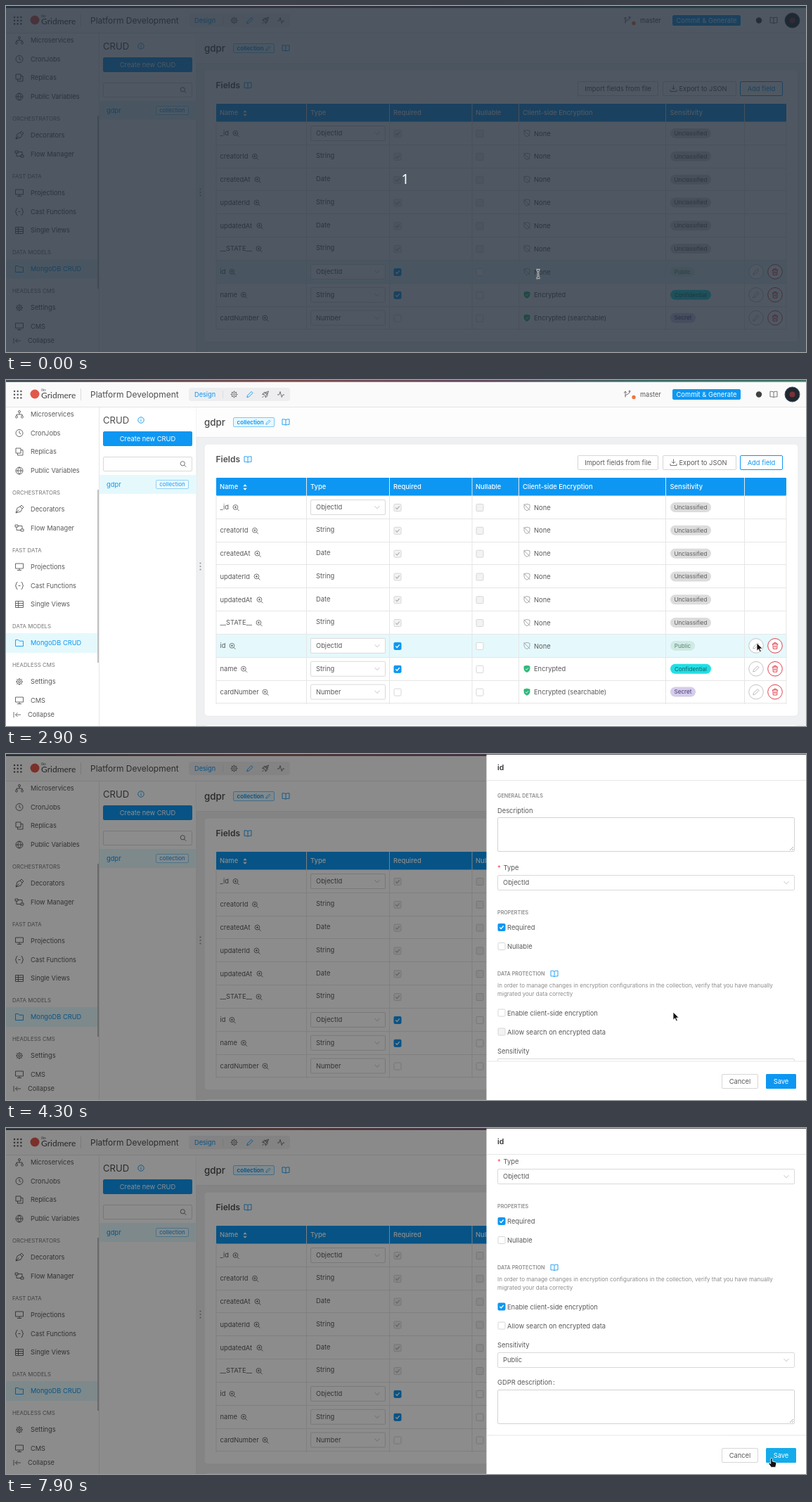
An HTML page for the animation above (8000 ms loop, 1138 by 492 pixels).

```html
<!DOCTYPE html>
<html lang="en">
<head>
<meta charset="utf-8">
<title>CRUD field editor</title>
<style>
html, body { margin: 0; width: 100%; height: 100%; overflow: hidden; background: #eff0f2; }
svg { display: block; width: 100vw; height: 100vh; font-family: Inter, sans-serif; }
</style>
</head>
<body>
<svg id="stage" viewBox="0 0 1138 492"></svg>
<script>
const BLUE = '#0d97f2', PALE = '#e5f9fd', INK = '#595959', LINE = '#e6e6e6';

// y is the middle of the capitals
const text = (x, y, str, { size = 9.35, fill = INK, weight = 400, anchor = 'start', font = '' } = {}) =>
  `<text x="${x}" y="${y + size * .36}" font-size="${size}" fill="${fill}" font-weight="${weight}"
    text-anchor="${anchor}" ${font && `font-family="${font}"`}>${str}</text>`;
const rect = (x, y, w, h, fill, stroke = 'none', r = 0, extra = '') =>
  `<rect x="${x}" y="${y}" width="${w}" height="${h}" fill="${fill}" stroke="${stroke}" rx="${r}" ${extra}/>`;
const circle = (x, y, r, fill, stroke = 'none') =>
  `<circle cx="${x}" cy="${y}" r="${r}" fill="${fill}" stroke="${stroke}"/>`;
const path = (d, x, y, stroke = '#666', fill = 'none', width = .9) =>
  `<path d="${d}" transform="translate(${x} ${y})" stroke="${stroke}" fill="${fill}" stroke-width="${width}"/>`;
const hline = (x, y, w, color = LINE) => rect(x, y, w, 1, color);
const vline = (x, y, h, color = LINE) => rect(x, y, 1, h, color);
const ring = (r, x = 0, y = 0) => `M${x - r} ${y}a${r} ${r} 0 1 0 ${2 * r} 0a${r} ${r} 0 1 0 ${-2 * r} 0`;

const icons = {
  book: 'M0-3.3V4.2M0-3.3C-1-4.2-3-4.3-5-4.2V3.4C-3 3.3-1 3.4 0 4.2C1 3.4 3 3.3 5 3.4V-4.2C3-4.3 1-4.2 0-3.3',
  pencil: 'M-4.2 4.2L-3.5 1.5 2-4 4-2-1.5 3.5Z',
  gear: ring(3.6) + ring(1.5) + 'M0-3.6V-5M0 3.6V5M-3.6 0H-5M3.6 0H5M-2.6-2.6L-3.6-3.6M2.6 2.6L3.6 3.6M2.6-2.6L3.6-3.6M-2.6 2.6L-3.6 3.6',
  rocket: 'M4.5-4.5Q0-4-2.5 .5L-.5 2.5Q4 0 4.5-4.5M-2-.5L-4.5 0-2-3H0M.5 2L0 4.5 3 2V0M-2.5 2.5L-4.5 4.5' + ring(1, 1.5, -1.5),
  pulse: 'M-5 .5H-2.5L-1-4 1.3 4 2.8 .5H5',
  zoom: ring(3.4, -.6, -.6) + 'M2 2L4.5 4.5M-2.2-.6H1M-.6-2.2V1',
  search: ring(3.1, -.7, -.7) + 'M1.6 1.6L4.2 4.2',
  chevron: 'M-3.4-1.8L0 1.8 3.4-1.8',
  trash: 'M-4.2-2.6H4.2M-1.6-2.6V-4.3H1.6V-2.6M-3.2-2.6L-2.7 4.4H2.7L3.2-2.6M-1-.6V2.4M1-.6V2.4',
  shield: 'M0-4.6L4-3.6V0Q4 3 0 4.8Q-4 3-4 0V-3.6Z',
  tick: 'M-2.7 0L-.8 2 2.7-2',
  info: ring(4.2) + 'M0-.6V2.3M0-2.5V-1.5',
  branch: 'M-3 4.5V-3.5M-4.8-1.5L-3-4 -1.2-1.5M-3 3C-3 0 3 1 3-3.5' + ring(1, 3, -4),
  load: 'M0-4.5V1.5M-2.6-1L0 1.6 2.6-1M-4.5 2V4.5H4.5V2',
  nodes: ring(1.5, 0, -4) + ring(1.5, -4, 3.5) + ring(1.5, 4, 3.5) + 'M0-2.5V0M-4 2V0H4V2',
  clock: ring(5) + 'M0-3V0L2.3 1.3',
  copy: 'M-5-5H2V2H-5ZM-2.5 2V5H5V-2.5H2',
  globe: ring(5) + 'M-5 0H5M0-5Q-4.5 0 0 5Q4.5 0 0-5',
  nib: 'M-5 5L-3-2 1-4 4 -1 2 3ZM1-4L3-6 6-3 4-1M-5 5L-.5 .5',
  flow: 'M-6-4.5H-2V-1.5H-6ZM2 1.5H6V4.5H2ZM-2-3H4V1.5M-4-1.5V3H2',
  screen: 'M-5.5-4.5H5.5V2.5H-5.5ZM-3 5H3M0 2.5V5',
  braces: 'M-2.5-5Q-4.5-5-4.5-2.5Q-4.5 0-6 0Q-4.5 0-4.5 2.5Q-4.5 5-2.5 5M2.5-5Q4.5-5 4.5-2.5Q4.5 0 6 0Q4.5 0 4.5 2.5Q4.5 5 2.5 5M-1.5 0H1.5',
  grid: 'M-5.5-4.5H5.5V4.5H-5.5ZM-5.5-1.5H5.5M-1.5-4.5V4.5M-5.5 1.5H5.5',
  folder: 'M-5.5-4.5H-1.5L0-2.8H5.5V4.5H-5.5Z',
  collapse: 'M-5-4V4M5 0H-2.5M.5-3L-2.5 0 .5 3'
};
const icon = (name, x, y, color = '#666', fill) => path(icons[name], x, y, color, fill);

const checkbox = (x, y, state) => {
  const on = state === 'on', off = state.startsWith('locked');
  const fill = on ? BLUE : off ? '#f3f3f3' : '#fff';
  return rect(x - 5, y - 5, 10, 10, fill, on || state === 'hover' ? BLUE : '#d6d6d6', 1.3) +
    (on || state === 'locked-on' ? path(icons.tick, x, y, on ? '#fff' : '#b5b5b5', 'none', 1.3) : '');
};
const select = (x, y, w, str) =>
  rect(x + .5, y - 10.5, w, 21, '#fff', '#d9d9d9', 1.5) + text(x + 8, y, str) + icon('chevron', x + w - 11, y, '#bdbdbd');
const button = (x, y, w, h, str, fill, stroke, color, size) =>
  rect(x + .5, y + .5, w - 1, h - 1, fill, stroke, 1.5) +
  text(x + w / 2, y + h / 2, str, { fill: color, anchor: 'middle', size });

function topBar() {
  let s = rect(0, 0, 1138, 38, '#fafafa') + hline(0, 38, 1138, '#e4e4e4') + rect(0, 0, 1138, 3, 'url(#strip)');
  for (let i = 0; i < 9; i++) s += circle(12 + i % 3 * 4.7, 16 + Math.floor(i / 3) * 4.7, 1.2, '#555');
  s += circle(41, 20, 6.5, '#e2574c') + text(50, 14, 'ilo', { size: 6.5, font: 'Lato, sans-serif' }) +
    text(50, 22, 'Gridmere', { size: 12, font: 'Lato, sans-serif', fill: '#444' }) + vline(106, 12, 17, '#ddd');
  s += text(120, 20.5, 'Platform Development', { size: 12, fill: '#505050' });
  s += rect(260, 11, 144, 19, '#eeeef0', 'none', 4) + text(268, 20.5, 'Design', { fill: BLUE, size: 9.2 }) + vline(308, 15, 11, '#ddd');
  s += icon('gear', 324.5, 20.5) + icon('pencil', 347, 20.5, BLUE) + icon('rocket', 369, 20.5) + icon('pulse', 391, 20.5);
  s += icon('branch', 884, 20) + circle(893, 24.5, 2.7, '#f0743e') + text(902, 20.5, 'master', { size: 9.2 });
  s += button(948, 13, 97, 15, 'Commit &amp; Generate', BLUE, BLUE, '#fff');
  s += circle(1071, 20.5, 4.2, '#404040') + icon('book', 1092, 20.5);
  return s + circle(1118.5, 20.5, 10.5, '#20272e', '#37505c') + circle(1118.5, 20.5, 4, '#7c3038');
}

function sidebar() {
  let s = rect(0, 39, 132, 453, '#fff');
  const items = [[49, 'nodes', 'Microservices'], [75.5, 'clock', 'CronJobs'], [102, 'copy', 'Replicas'],
    [129, 'globe', 'Public Variables'], [184, 'nib', 'Decorators'], [210.5, 'flow', 'Flow Manager'],
    [265.5, 'screen', 'Projections'], [292.5, 'braces', 'Cast Functions'], [319, 'grid', 'Single Views'],
    [374, 'folder', 'MongoDB CRUD'], [429, 'gear', 'Settings'], [455.5, 'screen', 'CMS']];
  const heads = [[160, 'ORCHESTRATORS'], [242, 'FAST DATA'], [350.5, 'DATA MODELS'], [405.5, 'HEADLESS CMS']];
  s += rect(0, 360, 131, 28, PALE);
  for (const [y, name, label] of items) {
    const color = name === 'folder' ? BLUE : INK;
    s += icon(name, 19, y, color) + text(35, y, label, { size: 9.25, fill: color });
  }
  for (const [y, label] of heads) s += text(9, y, label, { size: 7.85, fill: '#777' });
  return s + rect(0, 465, 132, 27, '#fff') + icon('collapse', 16, 476) + text(31, 476, 'Collapse', { size: 9.25 }) +
    vline(132, 39, 453) + rect(130, 156, 2, 246, '#c1c1c1');
}

function listPane() {
  return rect(133, 39, 138, 453, '#fff') + vline(270.5, 39, 453) +
    text(138, 57, 'CRUD', { size: 13.1, fill: '#505050' }) + icon('info', 192, 57, BLUE) +
    button(138, 73, 127, 21, 'Create new CRUD', BLUE, BLUE, '#fff') +
    rect(138.5, 109.5, 126, 20, '#fff', '#d9d9d9', 1.5) + icon('search', 252, 119.5) +
    rect(133, 135, 138, 27, PALE) + text(143, 148.5, 'gdpr', { fill: BLUE }) +
    button(213, 142, 47, 13, 'collection', '#effbff', '#8fd0f6', BLUE, 8);
}

const rows = [
  ['_id', 327, 'ObjectId'], ['creatorId', 354.5, 'String'], ['createdAt', 358, 'Date'], ['updaterId', 357, 'String'],
  ['updatedAt', 361, 'Date'], ['__STATE__', 360, 'String'], ['id', 322, 'ObjectId'], ['name', 338.5, 'String'],
  ['cardNumber', 369, 'Number']];
const tags = {
  Unclassified: [58, '#dcdcdc', '#5c5c5c'], Public: [35, '#cfeae3', '#5b8175'],
  Confidential: [58, '#21dfe4', '#125f68'], Secret: [36, '#d5ccec', '#473a70']
};

function table() {
  const step = 32.82, top = 164.5;
  let s = rect(299, 139, 811, 25.5, BLUE, 'none', 1);
  s += `<g id="hover">${rect(299, 361.5, 811, 33, PALE)}</g>`;
  [['Name', 304], ['Type', 433], ['Required', 551], ['Nullable', 668], ['Client-side Encryption', 735], ['Sensitivity', 944.5]]
    .forEach(([label, x]) => s += text(x, 152, label, { fill: '#fff', weight: 500 }));
  s += path('M-2.8-1.2L0-4.3 2.8-1.2ZM-2.8 1.2L0 4.3 2.8 1.2Z', 340, 152.5, 'none', '#fff');
  rows.forEach(([name, zoomX, type], i) => {
    const y = 181 + step * i, own = i > 5, secure = i > 6;
    s += hline(299, Math.round(top + step * (i + 1) - .5), 811);
    s += text(304.5, y, name) + icon('zoom', zoomX, y + .5);
    s += i === 0 || own ? select(433, y, 106, type) : text(441, y - 1, type);
    s += checkbox(557, y + .5, own ? (i < 8 ? 'on' : 'empty') : 'locked-on');
    s += checkbox(674, y + .5, own ? 'empty' : 'locked');
    s += icon('shield', 741, y, secure ? '#2fb878' : '#a0a0a0', secure ? '#2fb878' : 'none');
    s += secure ? path('M-2 0L-.4 1.5 2-1.4', 741, y, '#fff') : path('M-4.5-4.5L4.5 4.5', 741, y, '#a0a0a0');
    s += text(751, y + .3, ['None', 'Encrypted', 'Encrypted (searchable)'][Math.max(0, i - 6)]);
    const tag = own ? ['Public', 'Confidential', 'Secret'][i - 6] : 'Unclassified', [w, fill, color] = tags[tag];
    s += rect(945, y - 7, w, 14, fill, 'none', 7) + text(945 + w / 2, y, tag, { size: 8.1, fill: color, anchor: 'middle' });
    if (own) s += circle(1067, y, 10.3, '#fff', '#c4c4c4') + icon('pencil', 1067, y, '#b0b0b0') +
      circle(1094, y, 10.3, '#fff', '#e0404c') + icon('trash', 1094, y, '#dc2f3e');
  });
  for (const x of [427, 545, 662.5, 729, 938, 1050]) s += vline(x, 139, 322);
  return s + vline(298.5, 164, 297) + vline(1109.5, 164, 297);
}

function mainPane() {
  let s = rect(271, 39, 867, 42, '#fdfdfd') + hline(271, 81, 867, '#e8e8e8');
  s += text(282, 60, 'gdpr', { size: 13.3, weight: 500, fill: '#484848' });
  s += rect(323.5, 53.5, 58, 13, '#e8f8ff', '#7cc8f5', 1.5) +
    text(328.5, 60, 'collection', { size: 8.1, weight: 600, fill: BLUE }) +
    `<g transform="translate(373 60) scale(.75)">${icon('pencil', 0, 0, BLUE)}</g>` + icon('book', 398, 60, BLUE);
  for (const y of [265, 260.5, 269.5]) s += circle(276.5, y, 1.1, '#999');
  s += rect(282, 91, 845, 387, '#fff', '#e9eaec', 5) + rect(282, 490, 845, 20, '#fff', '#e9eaec', 5);
  s += text(298.5, 112.5, 'Fields', { size: 12, weight: 600, fill: '#505050' }) + icon('book', 344, 113, BLUE);
  s += button(813, 107, 115, 21, 'Import fields from file', '#fff', '#d6d6d6', INK) +
    rect(934.5, 107.5, 104, 20, '#fff', '#d6d6d6', 1.5) + icon('load', 949.5, 117) + text(957.5, 117.5, 'Export to JSON') +
    button(1044, 107, 61, 21, 'Add field', '#fff', BLUE, BLUE);
  return s + table();
}

function drawer() {
  const head = (y, str) => text(699, y, str, { size: 7.2, weight: 600, fill: '#8c8c8c' });
  const note = (y, str) => text(699, y, str, { size: 8, fill: '#8c8c8c' });
  const area = y => rect(699.5, y + .5, 422, 48, '#fff', '#d2d2d2', 1.5) + path('M-5 0L0-5M-2 0L0-2', 1120, y + 47, '#888', 'none', .7);
  const check = (y, label, state, id = '') => `<g id="${id}">${checkbox(705, y, state)}</g>` + text(713, y + .3, label);
  const body = head(59, 'GENERAL DETAILS') + text(699, 80.5, 'Description') + area(90) +
    text(699, 162, '*', { fill: '#ff4d4f' }) + text(707.5, 161.5, 'Type') + select(699, 183, 422, 'ObjectId') +
    head(225.5, 'PROPERTIES') + check(246.5, 'Required', 'on') + check(273.5, 'Nullable', 'empty') +
    head(312, 'DATA PROTECTION') + icon('book', 780, 312.5, BLUE) +
    note(329, 'In order to manage changes in encryption configurations in the collection, verify that you have manually') +
    note(341, 'migrated your data correctly') +
    '<rect id="pulse" fill="none"/>' +
    check(368, 'Enable client-side encryption', 'empty', 'enable') +
    check(395, 'Allow search on encrypted data', 'locked', 'allow') +
    text(699, 422.5, 'Sensitivity') + select(699, 444, 422, 'Public') +
    text(699, 476, 'GDPR description<tspan dx="1.3">:</tspan>') + area(486);
  return rect(683.5, 0, 455, 492, '#fff') +
    text(699, 19, 'id', { size: 10.5, weight: 600, fill: '#333' }) + hline(683.5, 37, 455) +
    `<g clip-path="url(#body)"><g id="scroll">${body}</g></g>` + hline(683.5, 436.5, 455) +
    button(1018, 455, 52, 21, 'Cancel', '#fff', '#d6d6d6', INK) +
    `<g id="save">${rect(1081, 455, 43, 21, 'currentColor', 'none', 1.5)}</g>` +
    text(1102.5, 465.5, 'Save', { fill: '#fff', anchor: 'middle' });
}

const pointers = {
  beam: path('M-2.5-6Q0-6 0-4.5Q0-6 2.5-6M0-5V5M-2.5 6Q0 6 0 4.5Q0 6 2.5 6', 0, 0, '#fff', 'none', 2.6) +
    path('M-2.5-6Q0-6 0-4.5Q0-6 2.5-6M0-5V5M-2.5 6Q0 6 0 4.5Q0 6 2.5 6', 0, 0, '#333', 'none', 1.1),
  arrow: path('M0 0V11.2L2.6 8.8 4.4 12.8 6.3 12 4.5 8.1H8.2Z', 0, 0, '#fff', '#111', .8),
  hand: path('M-1.3 0Q0-1.4 1.2 0V4L5.8 5.2Q7 5.6 6.8 7.2L5.6 12.4H-.4L-4 7.6Q-4.2 6.2-2.8 6.2L-1.3 7.4Z', 0, 0, '#fff', '#111', .8)
};

const stage = document.getElementById('stage');
stage.innerHTML = `<defs>
  <linearGradient id="strip"><stop stop-color="#38586e"/><stop offset=".35" stop-color="#c94a4d"/>
  <stop offset=".6" stop-color="#8a4a86"/><stop offset=".8" stop-color="#1f9d94"/><stop offset="1" stop-color="#27b085"/></linearGradient>
  <clipPath id="body"><rect x="683" y="38" width="456" height="398.5"/></clipPath></defs>
  ${rect(0, 0, 1138, 492, '#eff0f2')}${sidebar()}${listPane()}${mainPane()}${topBar()}
  ${rect(0, 0, 1138, 492, '#000', 'none', 0, 'id="mask"')}
  <g id="drawer">${drawer()}</g>
  ${rect(0, 0, 1138, .9, '#454545')}
  <g id="countdown">${rect(0, 0, 1138, 492, 'rgba(30,42,54,.78)')}
  ${text(568, 246, '1', { size: 19, fill: '#fff', anchor: 'middle', font: 'Noto Sans, sans-serif' })}</g>
  <g id="pointer"></g>`;
const $ = id => document.getElementById(id);
const setAttr = (id, attrs) => Object.entries(attrs).forEach(([k, v]) => $(id).setAttribute(k, v));
const progress = (t, a, b) => Math.min(1, Math.max(0, (t - a) / (b - a)));
const smooth = p => p * p * (3 - 2 * p);

// start, end, x, y of every pointer move
const moves = [[1300, 1900, 1074, 386], [2000, 2400, 1068, 374], [4200, 4300, 949, 367], [5100, 5300, 743, 249],
  [5400, 5600, 709, 251.5], [6700, 7200, 1087, 427], [7300, 7900, 1089, 470]];

function render(t) {
  let x = 757, y = 381;
  for (const [a, b, toX, toY] of moves) {
    const p = smooth(progress(t, a, b));
    x += (toX - x) * p;
    y += (toY - y) * p;
  }
  const hand = t >= 5600 && t < 6800 || t >= 7600;
  $('pointer').innerHTML = pointers[t < 1500 ? 'beam' : hand ? 'hand' : 'arrow'];
  setAttr('pointer', { transform: `translate(${x} ${y})` });

  const hidden = (1 - progress(t, 2973, 3273)) ** 5;
  setAttr('mask', { opacity: .45 * (1 - hidden) });
  setAttr('drawer', { transform: `translate(${455 * hidden} 0)`, opacity: t < 3000 ? 0 : 1 });
  setAttr('hover', { opacity: t < 3000 ? 1 : 0 });
  setAttr('countdown', { opacity: t < 200 ? 1 : 0 });
  setAttr('scroll', { transform: `translate(0 ${-114 * smooth(progress(t, 4300, 4700))})` });

  const checked = t >= 6100;
  $('enable').innerHTML = checkbox(705, 368, checked ? 'on' : t >= 5600 ? 'hover' : 'empty');
  $('allow').innerHTML = checkbox(705, 395, checked ? 'empty' : 'locked');
  const p = progress(t, 6060, 6420), r = 5 + 3 * p;
  setAttr('pulse', { x: 705 - r, y: 368 - r, width: 2 * r, height: 2 * r, rx: 2, stroke: BLUE, opacity: p > 0 ? .5 * (1 - p) : 0 });
  setAttr('save', { color: t >= 7600 ? '#14abea' : BLUE });
}

function tick(now) {
  render(Math.floor(now % 8000 / 100) * 100);
  requestAnimationFrame(tick);
}
render(0);
requestAnimationFrame(tick);
</script>
</body>
</html>
```
